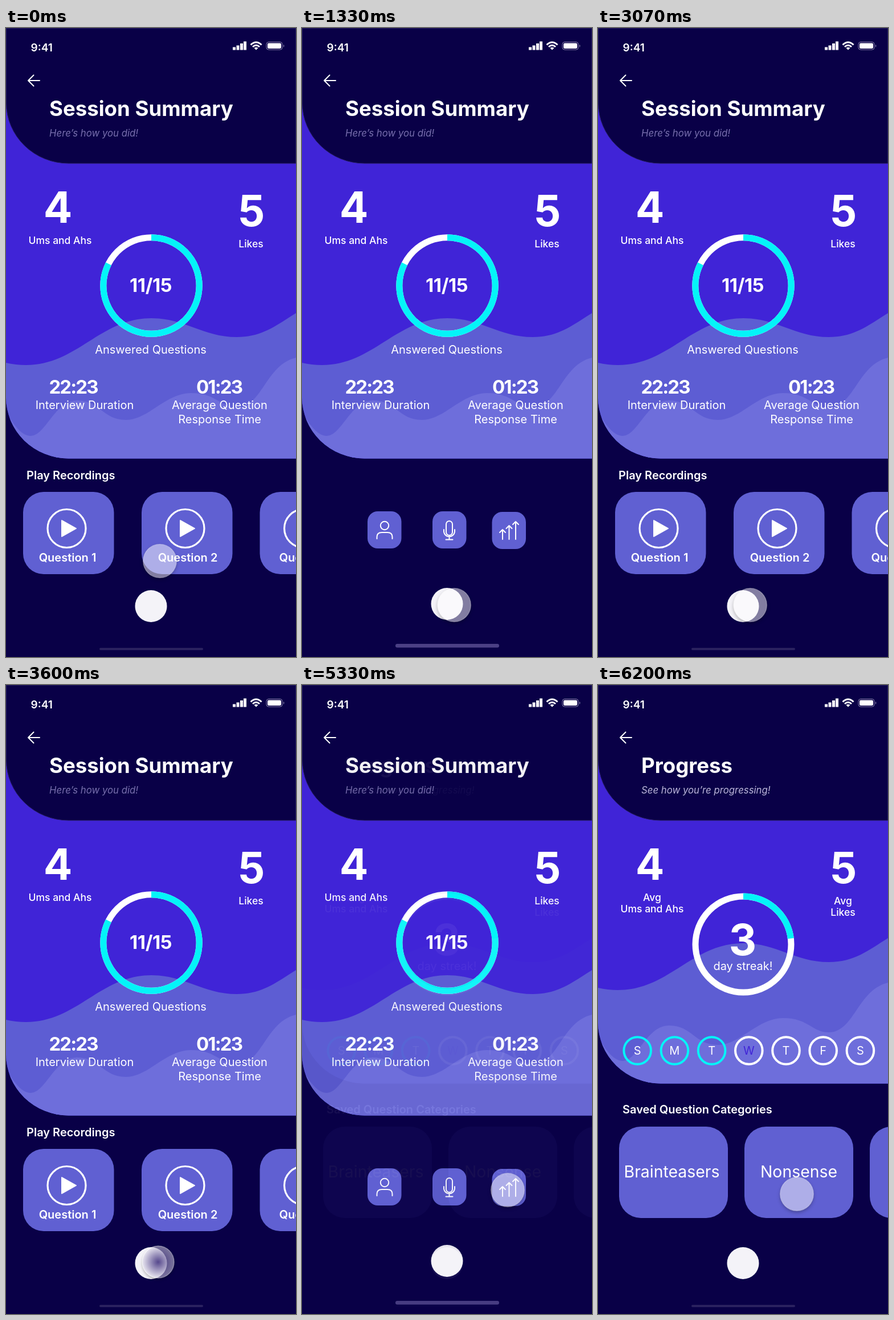
An HTML page for the animation above (6.27 s loop, 509 px wide and 1101 px high).

```html
<!DOCTYPE html>
<html lang="en">
<head>
<meta charset="utf-8">
<title>Session Summary</title>
<style>
  html, body { margin: 0; width: 100%; height: 100%; overflow: hidden; background: #090047; }
  svg { display: block; width: 100%; height: 100%; font: 400 20px Inter, Roboto, sans-serif; fill: #fff; }
  .mid { text-anchor: middle; }
  .bold { font-weight: 600; }
  .title { font-weight: 700; font-size: 36.6px; }
  .sub { font-style: italic; font-size: 16.8px; }
  .big { font-weight: 700; font-size: 75px; }
  .num { font-weight: 700; font-size: 33px; letter-spacing: -.4px; }
  .time { letter-spacing: -1.9px; }
  .small { font-weight: 500; font-size: 17.5px; }
  .name { font-size: 28.4px; }
  .bg { fill: #090047; }
  .card { fill: #6060d2; }
  .line { fill: none; stroke: #fff; stroke-width: 2; stroke-linecap: round; stroke-linejoin: round; }
  .ring { fill: none; stroke: #fff; stroke-width: 11; }
  .cyan { stroke: #04f4f8; }
</style>
</head>
<body>
<svg viewBox="0 0 509 1101" preserveAspectRatio="none">
  <defs>
    <clipPath id="panelClip"><path d="M0 100H509V753.500H110A110 107 0 0 1 0 646.500Z"/></clipPath>
    <clipPath id="outside"><path clip-rule="evenodd" d="M-50 -50H50V50H-50ZM-29 0A29 29 0 0 0 29 0A29 29 0 0 0 -29 0Z"/></clipPath>
    <radialGradient id="pressFill">
      <stop offset="0" stop-color="#2c1b70" stop-opacity=".8"/>
      <stop offset="1" stop-color="#2c1b70" stop-opacity=".1"/>
    </radialGradient>
    <g id="panel" clip-path="url(#panelClip)">
      <path fill="#4024d7" d="M0 100H509V754H0Z"/>
      <path fill="#5d5dd3" d="M0 586Q17 590 35 590C125 590 165 508 255 508C315 508 345 541 405 541C450 541 475 520 509 499V754H0Z"/>
      <path fill="#6e6edb" d="M0 670C15 700 30 714 43 714C70 714 85 652 125 652S170 686 210 686S280 639 325 639S375 664 405 664C450 664 455 590 509 577V754H0Z"/>
    </g>
    <g id="scores" class="mid big"><text x="91" y="341">4</text><text x="431" y="347">5</text></g>
    <circle id="badge" cx="254.500" cy="1012" r="28" fill="#f4f3f8"/>
    <rect id="bar" x="164" y="1085" width="182" height="4" rx="2" fill="#2a215f"/>
    <g id="play">
      <rect class="card" x="30" y="812" width="159.500" height="144" rx="36"/>
      <circle class="line" style="stroke-width:3.2" cx="106.500" cy="876" r="33.500"/>
      <path class="line" style="fill:#fff" d="M98 862V890L123 876Z"/>
    </g>
    <rect id="category" class="card" x="37" y="773" width="191" height="160" rx="38"/>
    <rect id="tile" class="card" width="59.500" height="65" rx="18"/>
  </defs>

  <rect class="bg" width="509" height="1101"/>

  <g id="session">
    <use href="#panel"/>
    <use href="#scores"/>
    <g class="mid">
      <text class="small" x="95" y="378">Ums and Ahs</text>
      <text class="small" x="430" y="384">Likes</text>
      <circle class="ring" cx="255" cy="451" r="84.200"/>
      <circle class="ring cyan" cx="255" cy="451" r="84.200" pathLength="100" stroke-dasharray="82.5 100" transform="rotate(-90 255 451)"/>
      <text class="num" x="254" y="462">11/15</text>
      <text x="254" y="570">Answered Questions</text>
      <text class="num time" x="118" y="640">22:23</text>
      <text x="138" y="667">Interview Duration</text>
      <text class="num time" x="374" y="640">01:23</text>
      <text x="375" y="667">Average Question</text>
      <text x="375" y="692">Response Time</text>
    </g>
    <text class="bold" x="36" y="790">Play Recordings</text>
    <use href="#play"/><use href="#play" x="208"/><use href="#play" x="415.500"/>
    <g class="mid bold">
      <text x="108" y="934">Question 1</text>
      <text x="319" y="934">Question 2</text>
      <text x="532" y="934">Question 3</text>
    </g>
    <use href="#badge"/><use href="#bar"/>
  </g>

  <g id="menu">
    <rect class="bg" y="754" width="509" height="347"/>
    <use href="#tile" x="115" y="846"/><use href="#tile" x="229" y="846"/><use href="#tile" x="333.500" y="847"/>
    <g class="line">
      <circle cx="145" cy="871" r="7.200"/>
      <path d="M131.500 894V891Q131.500 883 140 883H150Q158.500 883 158.500 891V894"/>
      <rect x="253" y="863" width="11" height="25" rx="5.500"/>
      <path d="M249 878V882A9.600 9.600 0 0 0 268 882V878M258.500 892V895.500M252.500 895.500H264.500"/>
      <path d="M352 895V878M347 883L352 878L357 883M363.500 895V871M358.500 876L363.500 871L368.500 876M375 895V864M370 869L375 864L380 869"/>
    </g>
    <use href="#badge" y="-4"/>
    <rect x="164" y="1078" width="182" height="6.500" rx="3.200" fill="#4b4085"/>
  </g>

  <g id="progress">
    <rect class="bg" width="509" height="1101"/>
    <use href="#panel" y="-56"/>
    <use href="#scores"/>
    <g class="mid">
      <g class="small">
        <text x="95" y="378">Avg</text><text x="95" y="398">Ums and Ahs</text>
        <text x="430" y="384">Avg</text><text x="430" y="404">Likes</text>
      </g>
      <circle class="ring" cx="255" cy="454" r="84"/>
      <circle class="ring cyan" cx="255" cy="454" r="84" pathLength="100" stroke-dasharray="23 100" transform="rotate(-90 255 454)"/>
      <text class="big" x="254" y="473">3</text>
      <text x="254.500" y="499">day streak!</text>
      <g id="days"></g>
    </g>
    <text class="bold" x="43" y="750">Saved Question Categories</text>
    <use href="#category"/><use href="#category" x="220"/><use href="#category" x="440"/>
    <g class="mid name">
      <text x="129.500" y="862">Brainteasers</text>
      <text x="352.500" y="862">Nonsense</text>
    </g>
    <use href="#badge"/><use href="#bar"/>
  </g>

  <path d="M.5 .5H508.500V237H110A109.500 106 0 0 1 .5 131Z" class="bg" stroke="#261d60"/>
  <text class="bold" style="font-size:19px" x="43.500" y="41">9:41</text>
  <path d="M398 33.500h5v5h-5zM404.500 30.500h5v8h-5zM411 27h5v11.500h-5zM417 23.500h5v15h-5z"/>
  <g class="line" style="stroke-width:3;stroke-linecap:butt">
    <path d="M429.500 29.500Q439 20.500 448.500 29.500M433 33Q439 27.500 445 33"/>
  </g>
  <path d="M435.500 35Q439 32.500 442.500 35L439 38.500Z"/>
  <rect x="457" y="24.500" width="28" height="13.500" rx="4" fill="none" stroke="#8b85ad"/>
  <rect x="459" y="26.500" width="24" height="9.500" rx="2.300"/>
  <path d="M487 29q2.500 2 0 5z" fill="#8b85ad"/>
  <path class="line" d="M59 92H39M48.500 82.500L39 92L48.500 101.500"/>
  <g id="sessionTitle">
    <text class="title" x="76" y="154">Session Summary</text>
    <text class="sub" x="76" y="190" fill="#776fad">Here’s how you did!</text>
  </g>
  <g id="progressTitle">
    <text class="title" x="76" y="154">Progress</text>
    <text class="sub" x="76" y="190" fill="#bbb6da">See how you’re progressing!</text>
  </g>

  <g id="cursor">
    <g clip-path="url(#outside)"><circle cy="3" r="29" fill="#000" fill-opacity=".3" style="filter:blur(3px)"/></g>
    <circle r="29.300" fill-opacity=".49" stroke="#fff" stroke-opacity=".35" stroke-width="1.200"/>
    <circle id="press" r="28.500" fill="url(#pressFill)"/>
  </g>
</svg>
<script>
const LOOP = 6270;
const $ = id => document.getElementById(id);
const ease = (t, from, to) => {
  const u = Math.min(1, Math.max(0, (t - from) / (to - from)));
  return u * u * (3 - 2 * u);
};

$('days').innerHTML = [...'SMTWTFS'].map((day, i) => {
  const x = 69.2 + i * 65.2;
  return `<circle class="line ${i < 3 ? 'cyan' : ''}" style="stroke-width:4" cx="${x}" cy="640" r="23.8"/>
    <text x="${x}" y="647" fill="${day === 'W' ? '#4024d7' : '#fff'}">${day}</text>`;
}).join('');

// Each move: start, end, control point, destination
const moves = [
  [40, 530, 269, 972, 267, 1010],
  [4000, 4670, 270, 897, 361, 884],
  [5870, 6200, 356, 888, 349, 891]
];

function cursorAt(t) {
  let x = 270, y = 933;
  for (const [from, to, cx, cy, ex, ey] of moves) {
    const u = ease(t, from, to), v = 1 - u;
    x = v * v * x + 2 * u * v * cx + u * u * ex;
    y = v * v * y + 2 * u * v * cy + u * u * ey;
  }
  return [x, y];
}

const tap = (t, at) => ease(t, at, at + 200) - ease(t, at + 230, at + 430);

function draw(t) {
  const menu = ease(t, 930, 1330) - ease(t, 2270, 2600) + ease(t, 3600, 4000);
  const progress = ease(t, 5250, 5810);
  const press = tap(t, 700) + tap(t, 3370);
  const [x, y] = cursorAt(t);
  $('menu').style.opacity = menu;
  $('progress').style.opacity = $('progressTitle').style.opacity = progress;
  $('sessionTitle').style.opacity = 1 - progress;
  $('press').style.opacity = press;
  $('cursor').setAttribute('transform', `translate(${x} ${y}) scale(${1 - 0.04 * press})`);
}

const start = performance.now();
function tick() {
  draw((performance.now() - start) % LOOP);
  requestAnimationFrame(tick);
}
tick();
</script>
</body>
</html>
```
